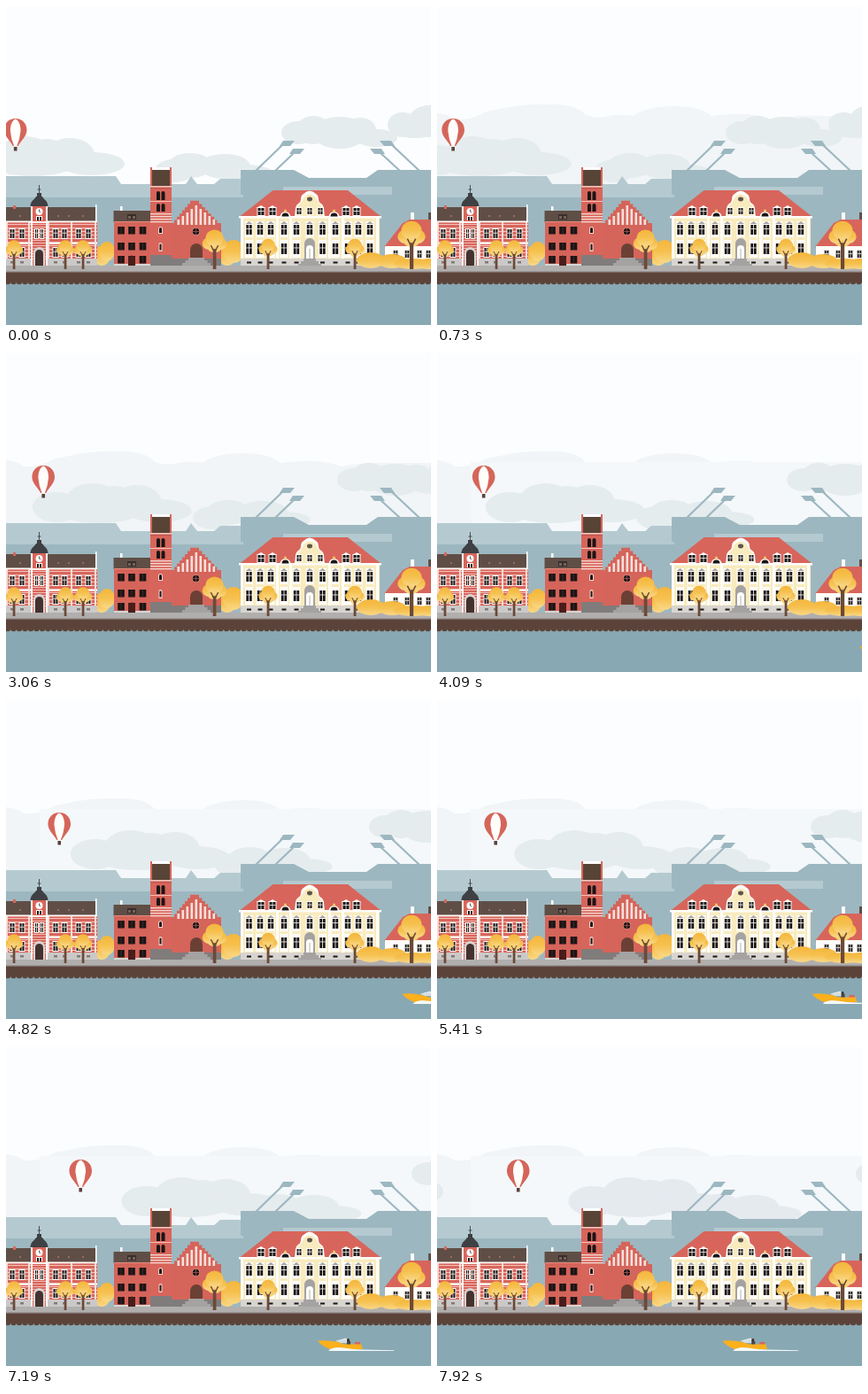
An HTML page that plays this animation: 480 px wide and 360 px high, repeating every 8 s.

```html
<!DOCTYPE html>
<html lang="en">
<head>
<meta charset="utf-8">
<title>Harbour town</title>
<style>
html, body { margin: 0; width: 100%; height: 100%; overflow: hidden; background: #fcfdfe; }
svg { display: block; width: 480px; height: 360px; }
</style>
</head>
<body>
<svg id="stage" viewBox="0 0 480 360" xmlns="http://www.w3.org/2000/svg"></svg>
<script>
const RED = '#d8655b', BRICK = '#d5645a', DARK = '#1a1515', ROOF = '#5f4e46',
      STEEL = '#9db7c0', PALE = '#b5cad0', WHITE = '#fffdfa', GREY = '#a5a2a2',
      STONE = '#807c7c', CREAM = '#f8ebbd', SKY = '#fcfdfe';

const rect = (x, y, w, h, fill) => `<rect x="${x}" y="${y}" width="${w}" height="${h}" fill="${fill}"/>`;
const oval = (x, y, rx, ry, fill) => `<ellipse cx="${x}" cy="${y}" rx="${rx}" ry="${ry}" ${fill ? `fill="${fill}"` : ''}/>`;
const path = (d, fill) => `<path d="${d}" fill="${fill}"/>`;
const line = (d, color, width, extra = '') => `<path d="${d}" fill="none" stroke="${color}" stroke-width="${width}" ${extra}/>`;
const group = (id, body) => `<g id="${id}">${body}</g>`;
const each = (list, make) => list.map(make).join('');
const range = (n, make) => Array.from({ length: n }, (_, i) => make(i)).join('');
const arch = (x, y, w, h, fill) =>
  path(`M${x} ${y + h}V${y + w / 2}a${w / 2} ${w / 2} 0 0 1 ${w} 0V${y + h}Z`, fill);

// Dark panes in a white frame, split by a cross.
const sash = (cx, y, w, h, frame = WHITE) =>
  rect(cx - w / 2 - 1, y - 1, w + 2, h + 2, frame) + rect(cx - w / 2, y, w, h, DARK) +
  rect(cx - .4, y, .8, h, frame) + rect(cx - w / 2, y + h * .38, w, .8, frame);

const cloud = (id, ovals) => group(id, each(ovals, o => oval(...o)));

function clouds() {
  return `<g id="clouds">` +
    cloud('east', [[448, 134, 17, 14], [479, 130, 25, 18], [503, 136, 22, 13], [462, 141, 24, 8]]) +
    cloud('middle', [[330, 143, 19, 13], [347, 140, 20, 16], [377, 143, 31, 18], [400, 140, 18, 14], [418, 149, 24, 10]]) +
    cloud('low', [[190, 186, 22, 13], [208, 180, 25, 14], [247, 181, 29, 14], [270, 188, 31, 9]]) +
    cloud('west', [[-18, 174, 28, 17], [22, 167, 30, 20], [46, 170, 26, 20], [72, 168, 28, 19], [97, 178, 37, 13], [30, 180, 45, 12]]) +
    cloud('entering', [[-14, 163, 21, 13], [-38, 158, 26, 18]]) + `</g>`;
}

function haze() {
  return group('haze',
    path('M0 121C10 122 16 125 20 128Q36 129 48 123Q56 118 62 118Q90 111 115 111H130Q158 111 168 123Q180 127 190 125Q204 121 222 124Q234 114 266 113Q298 113 310 124Q335 121 350 122Q370 124 378 128Q410 122 440 124H480V215H0Z', '#f1f5f8')) +
    group('mist', rect(38, 123, 442, 92, '#f4f8fa'));
}

function crane(jib, foot, topX, topY, dir) {
  return line(`M${foot} 187L${topX} ${topY + 1}`, STEEL, 2.2) +
    path(`M${jib} ${topY - 3}h${13 * dir}l${-5 * dir} 6h${-12 * dir}Z`, STEEL);
}

function shipyard() {
  return path('M0 192H124L130 201H203L209 192L216 201H235L242 195H300V295H0Z', PALE) +
    rect(0, 216, 270, 79, STEEL) +
    crane(313, 281, 313, 155, 1) + crane(324, 303, 326, 164, 1) +
    crane(435, 468, 435, 155, -1) + crane(424, 446, 422, 164, -1) +
    path('M265 185H325L342 194H407L420 185H480V295H268V213H265Z', STEEL) +
    rect(313, 204, 123, 9, PALE);
}

function tree(x, y, r) {
  const fork = y + r * .6, arm = r * .3;
  return `<g fill="url(#gold)">` + oval(x, y + r * .4, r * .62, r * .5) +
    oval(x - r * .45, y + r * .15, r * .56, r * .5) + oval(x + r * .45, y + r * .15, r * .56, r * .5) +
    oval(x, y - r * .3, r * .74, r * .68) + '</g>' +
    rect(x - r * .13, fork, r * .27, 297 - fork, '#6b4a38') +
    line(`M${x - arm} ${fork - arm}L${x} ${fork + arm}L${x + arm} ${fork - arm}`, '#6b4a38', r * .1);
}

const bush = (x, y, rx, ry) => oval(x, y, rx, ry, 'url(#gold)');

function townHall() {
  const cols = [7, 18, 56, 66, 82, 93];
  return rect(0, 227, 102, 17, ROOF) + rect(8, 225, 3, 4, RED) + rect(101, 224, 1.5, 20, WHITE) +
    each([15, 58, 70, 86], x => rect(x, 236, 2, 2, '#9b6a5f')) +
    rect(0, 243, 103, 48, RED) +
    range(11, i => rect(0, 246 + i * 4, 103, 1, '#f3c4bd')) +
    rect(0, 242.5, 103, 1.8, WHITE) + rect(0, 267, 103, 1.8, WHITE) +
    each([1, 26, 48, 74, 101], x => rect(x - 1, 244, 2, 46, '#f8dcd6')) +
    each(cols, x => sash(x, 252, 5, 10) + sash(x, 273, 5, 10)) +
    rect(0, 285, 103, 8, '#cbc9c8') + each(cols, x => rect(x - 2, 288, 4, 2.5, STONE)) +
    rect(28, 226, 19, 67, RED) + range(14, i => rect(28, 246 + i * 3, 19, .9, '#f3c4bd')) +
    rect(28, 226, 2, 67, WHITE) + rect(45, 226, 2, 67, WHITE) + rect(27, 243, 21, 2, WHITE) +
    oval(37.5, 232, 4, 4, WHITE) + line('M37.5 229.5V232L39 233', DARK, .7) +
    rect(34, 237, 7, 5, WHITE) + rect(35, 238, 2, 4, DARK) + rect(38, 238, 2, 4, DARK) +
    sash(34.5, 252, 3, 10) + sash(40.5, 252, 3, 10) +
    path('M27.5 226C28 219 32 219 34 215H41C43 219 47 219 47.5 226Z', '#3e4043') +
    rect(35, 211, 5, 5, '#3e4043') + line('M37.5 202V213M35.5 207H39.5', '#3e4043', .9) +
    arch(31, 272, 13, 21, '#d8d4d2') + arch(33, 275, 9, 18, '#43322f');
}

function brickHouse() {
  return rect(129, 226, 2.5, 6, WHITE) + rect(121.5, 231, 42, 13, ROOF) +
    rect(137, 235, 10, 6, '#382e2c') + rect(138, 237, 3, 3, '#75625a') + rect(143, 237, 3, 3, '#75625a') +
    rect(122, 244, 41, 49, BRICK) + rect(122, 243, 41, 1, '#e58a7d') +
    each([249, 267, 282], y => each([130, 142, 154.5], x =>
      rect(x - 3.8, y, 7.6, 8.5, DARK) + rect(x - .3, y, .6, 8.5, '#5d3531'))) +
    path('M138 293V284Q142 279 146 284V293Z', '#4a1d1b') + rect(122, 291, 16, 2, '#d8d5d3') +
    rect(146, 291, 17, 2, '#d8d5d3');
}

function belfry() {
  return rect(163, 182, 24, 100, RED) + rect(165, 182, 20, 3, SKY) +
    rect(165, 185, 20, 18, '#584436') +
    rect(163, 203, 24, 1.6, '#f1c2b9') + rect(163, 205, 24, 1.2, '#bd544b') +
    each([170, 175.5], x => arch(x, 209, 4, 10, DARK) + arch(x, 223, 4, 9, DARK)) +
    rect(163, 220, 24, 1, '#f1c2b9') +
    range(4, i => rect(163, 234 + i * 3, 24, 1.3, '#f6d9d3')) +
    arch(172, 249, 5, 8, '#f4d0c8') + arch(173, 250, 3, 6, DARK) +
    arch(172.5, 267, 4, 10, '#f4d0c8') + arch(173.5, 268.5, 2, 7, DARK) +
    rect(163, 281, 24, 12, STONE);
}

function gable() {
  let steps = 'M187 293V245H190';
  for (let i = 1; i <= 7; i++) steps += `V${245 - i * 3.6}h3`;
  steps += 'H218';
  for (let i = 6; i >= 0; i--) steps += `V${245 - i * 3.6}h3.4`;
  return path(steps + 'H243V293Z', BRICK) +
    range(9, i => {
      const off = Math.abs(i - 4), top = 225 + off * 4;
      return rect(193.5 + i * 5, top, 2.6, 247 - top, '#f7dfda');
    }) +
    oval(214.5, 254.5, 4.6, 4.6, '#e59083') + oval(214.5, 254.5, 3.8, 3.8, DARK) +
    line('M211 254.5H218M214.5 251V258', '#a6564e', .8) +
    arch(208, 268, 14, 17, '#6b4034') + rect(187, 285, 56, 8, STONE) +
    range(3, i => rect(206 - i * 3.5, 284 + i * 3, 18 + i * 7, 3, GREY));
}

function mansion() {
  const cols = [274.5, 287, 299, 314, 328, 343, 357.5, 372, 386, 398, 411];
  return path('M263.5 238L301.5 208H386L424 238Z', RED) +
    rect(265, 238, 157, 55, CREAM) + rect(263, 237, 161, 2.5, WHITE) +
    each([265, 305, 320, 364, 379, 418], x => rect(x, 239, 3, 50, WHITE)) +
    each([288, 301, 384, 396], x => path(`M${x - 5} 228L${x} 225L${x + 5} 228Z`, WHITE) + sash(x, 228, 7, 8)) +
    each([315.5, 370.5], x => arch(x - 6, 232, 12, 6, WHITE) + arch(x - 4, 233.5, 8, 4, DARK) +
      oval(x, 231, 1.6, 1.6, '#f3c765')) +
    path('M325 239C328 235 325 226 330 223C335 221 331 215 336 212Q343 205 350 212C355 215 351 221 356 223C361 226 358 235 361 239Z', WHITE) +
    path('M328 238V227Q334 223 336 216Q343 209 350 216Q352 223 358 227V238Z', CREAM) +
    oval(343, 218, 3, 2.4, '#5d5650') +
    each([331, 343, 355], x => sash(x, 228, 5, 7)) + rect(323, 237, 40, 2, WHITE) +
    each(cols, x => rect(x - 4.5, 243, 9, 41, WHITE) + path(`M${x - 4} 246L${x} 243L${x + 4} 246Z`, GREY) +
      sash(x, 247, 6.4, 11) + rect(x - 4, 261, 8, 3, CREAM) + sash(x, 268, 6.4, 12)) +
    rect(265, 285, 157, 8, '#d8d5d1') + each(cols, x => rect(x - 2.5, 288.5, 5, 2, DARK)) +
    arch(337, 262, 12, 24, GREY) + arch(339, 270, 8, 16, WHITE) + rect(342.6, 274, .8, 12, GREY) +
    range(3, i => rect(336 - i * 3, 285 + i * 3, 14 + i * 6, 3, GREY));
}

function cottage() {
  return rect(457, 233, 4, 10, WHITE) + path('M427 272L448 245L456 241H480V272Z', RED) +
    rect(477, 233, 3, 8, ROOF) + rect(428, 271, 52, 22, WHITE) +
    each([440, 453, 467, 477], x => sash(x, 276, 4.5, 8, '#eceae6'));
}

function quay() {
  return rect(0, 293, 480, 7, '#b1aeae') + rect(0, 299, 480, 2, '#9a9696') +
    rect(0, 311, 480, 49, '#88a8b3') + rect(0, 300.5, 480, 10.5, '#5c4339') +
    line('M2 311H484', '#5c4339', 6.6, 'stroke-linecap="round" stroke-dasharray="0 6.5"');
}

const balloon = () => group('balloon',
  path('M0 127C8 127 12.8 133 12.8 140C12.8 147 6 152 3 158H-3C-6 152 -12.8 147 -12.8 140C-12.8 133 -8 127 0 127Z', '#d5655a') +
  path('M0 127.5C4.5 130 5.8 135 5.8 141Q5 150 1.6 158H-1.6Q-5 150 -5.8 141C-5.8 135 -4.5 130 0 127.5Z', WHITE) +
  rect(-1.8, 159, 3.6, 4.5, '#5a423c'));

const boat = () => group('boat',
  path('M22 332L32 329L35 334H25Z', '#cfdde1') + line('M21 332L32 329L34 333', '#fff', .8) +
  oval(34.5, 331, 1.6, 2.1, '#3a3231') + rect(33, 332, 4, 4, '#4b4341') + rect(42, 333, 6, 4, RED) +
  path('M0 331.5Q12 330.5 23 333L30 335.5H49L51 341H14Q5 338 0 331.5Z', '#fbb01c') +
  path('M12 342.5Q18 337.5 29 339.5T50 341.5L86 342.3V343H14Z', '#f4f8f9'));

const defs = `<defs><linearGradient id="gold" x2="0" y2="1">
  <stop stop-color="#f4b63c"/><stop offset=".5" stop-color="#f6c14f"/><stop offset="1" stop-color="#f9d888"/>
  </linearGradient></defs>`;

const stage = document.getElementById('stage');
stage.innerHTML = defs + rect(0, 0, 480, 360, SKY) + haze() + clouds() + balloon() + shipyard() +
  bush(108, 282, 10, 11) + bush(114, 277, 9, 11) + bush(250, 282, 10, 11) + bush(257, 277, 12, 13) +
  townHall() + brickHouse() + gable() + belfry() + mansion() + cottage() + quay() +
  bush(412, 287, 16, 9) + bush(436, 288, 16, 8) + bush(460, 291, 22, 6) + bush(478, 291, 16, 6) +
  each([[9, 274, 10], [67, 274, 10], [87, 274, 10], [235.5, 266, 13.7], [296, 273, 10.5], [394, 273, 10.5], [458, 258, 15.5]], t => tree(...t)) +
  boat();

const LOOP = 8000, STEP = 146.4;
// id, start x, pixels per second
const drift = [['balloon', 10.7, 10.25], ['west', 0, 24.6], ['low', 0, 14], ['middle', 0, 20.5],
               ['east', 0, 15], ['entering', -162, 20.5], ['boat', 644, -40.7]];
const part = id => document.getElementById(id);
const start = performance.now();

function draw() {
  const time = (performance.now() - start) % LOOP;
  const step = Math.floor((time + 16) / STEP), seconds = step * STEP / 1000;
  for (const [id, x, speed] of drift)
    part(id).setAttribute('transform', `translate(${(x + speed * seconds).toFixed(2)} 0)`);
  part('haze').setAttribute('visibility', step >= 1 ? 'visible' : 'hidden');
  part('mist').setAttribute('visibility', step >= 28 ? 'visible' : 'hidden');
  part('clouds').setAttribute('fill', step >= 51 ? '#e5eaef' : '#e5ecee');
  requestAnimationFrame(draw);
}
draw();
</script>
</body>
</html>
```
